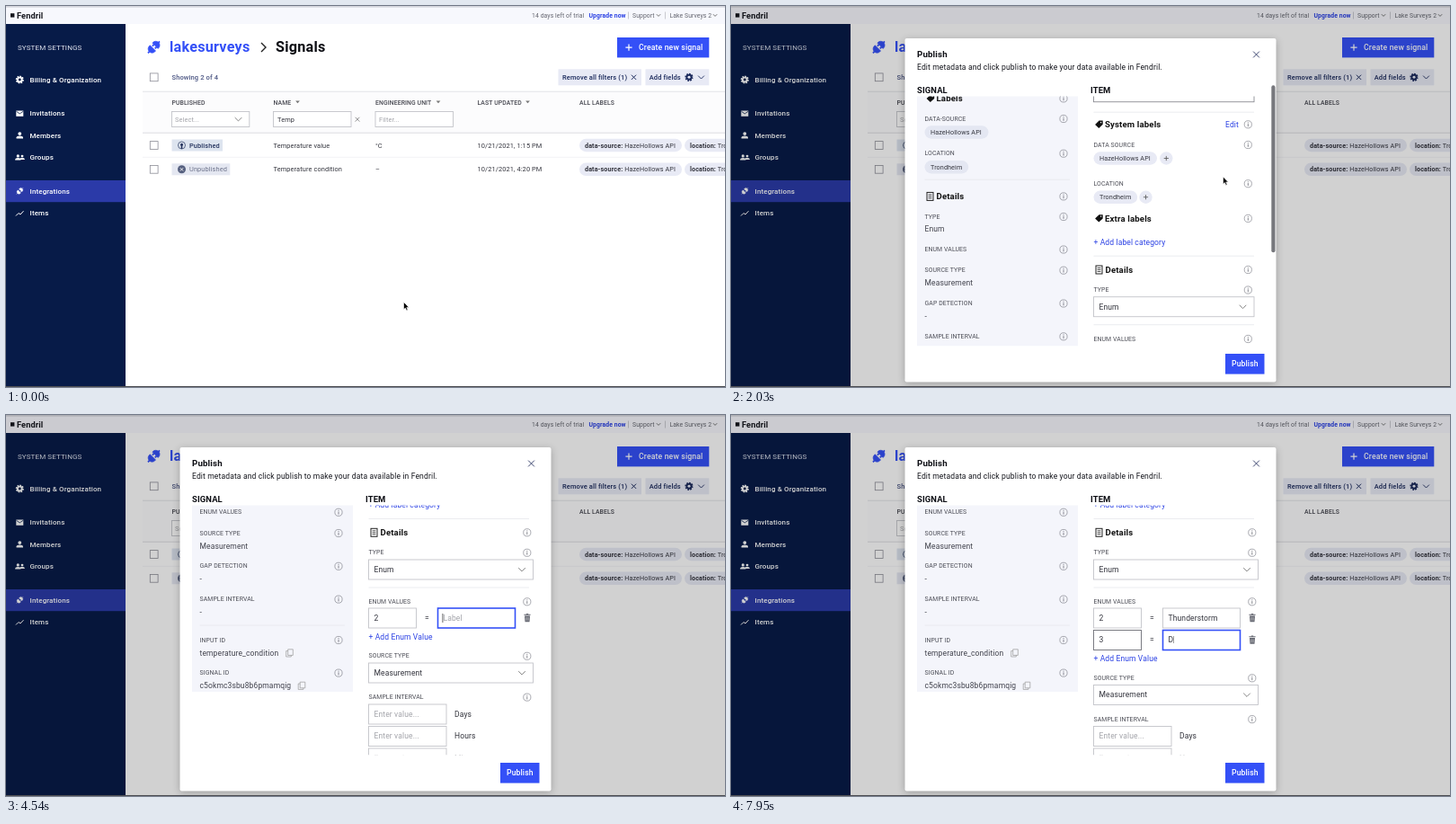
These frames come from a looping animation (800x424 px, 8000 ms). An HTML page:

```html
<!DOCTYPE html>
<html lang="en">
<head>
<meta charset="utf-8">
<title>Publish a signal</title>
<style>
  html, body { margin: 0; width: 100%; height: 100%; overflow: hidden; background: #fff; }
  svg { display: block; width: 800px; height: 424px; }
  text { font-family: Roboto, sans-serif; letter-spacing: .015em; white-space: pre; }
</style>
</head>
<body>
<svg id="stage" viewBox="0 0 800 424"></svg>
<script>
const BLUE = '#3450f7', LINK = '#2b41e4', INK = '#33343d', GREY = '#a3a4aa', CHIP = '#e8eaf5', NAVY = '#1b2a5c';
const LOOP = 8000;
const API = 'HazeHollows API';

// Drawing helpers; text is placed by its left edge and vertical centre.
const text = (x, y, s, size = 8.5, fill = INK, weight = 400, extra = '') =>
  `<text x="${x}" y="${y + size * .35}" font-size="${size}" fill="${fill}" font-weight="${weight}">${s}${extra}</text>`;
const rect = (x, y, w, h, fill, more = '') =>
  `<rect x="${x}" y="${y}" width="${w}" height="${h}" fill="${fill}" ${more}/>`;
const path = (d, stroke, width = 1, fill = 'none', more = '') =>
  `<path d="${d}" stroke="${stroke}" stroke-width="${width}" fill="${fill}" ${more}/>`;
const group = (x, y, content, more = '') => `<g transform="translate(${x} ${y}) ${more}">${content}</g>`;
const box = (x, y, w, h, stroke = '#c3c4c9', width = .9) =>
  rect(x, y, w, h, '#fff', `stroke="${stroke}" stroke-width="${width}"`);
const rule = (x1, x2, y, color = '#e6e7ec') => path(`M${x1} ${y}H${x2}`, color, .8);
const chevron = (x, y, r = 4, color = '#666') => path(`M${x - r} ${y - r / 2}l${r} ${r}l${r} ${-r}`, color, .9);
const cross = (x, y, r, color, width = 1) =>
  path(`M${x - r} ${y - r}l${2 * r} ${2 * r}m0 ${-2 * r}l${-2 * r} ${2 * r}`, color, width);
const plus = (x, y, r, color, width = 1) => path(`M${x - r} ${y}h${2 * r}M${x} ${y - r}v${2 * r}`, color, width);
const gear = (x, y, r, color, hole) =>
  `<circle cx="${x}" cy="${y}" r="${r * .85}" fill="none" stroke="${color}" stroke-width="${r * .4}" pathLength="16" stroke-dasharray="1.2 .8"/>
   <circle cx="${x}" cy="${y}" r="${r * .78}" fill="${color}"/><circle cx="${x}" cy="${y}" r="${r * .34}" fill="${hole}"/>`;
const plug = (x, y, scale, color) => group(x, y,
  path('M-1.5-5.4H-3A5.4 5.4 0 0 0-3 5.4H-1.5ZM3-5.4H4A5.4 5.4 0 0 1 4 5.4H3Z', color, .8, color) +
  path('M-8 0H-11M9 0H11.5M0-2.5H3M0 2.5H3', color, 2.2), `rotate(-45) scale(${scale})`);
const info = (x, y) => `<circle cx="${x}" cy="${y}" r="4.1" fill="none" stroke="#85868e" stroke-width=".7"/>` +
  path(`M${x} ${y - .7}v3M${x} ${y - 2.4}v1`, '#777881', .9);
const chip = (x, y, w, s, fill = CHIP) => rect(x, y - 7.2, w, 14.4, fill, 'rx="7.2"') + text(x + 6.5, y, s, 7.2);
const plusChip = (x, y) => `<circle cx="${x}" cy="${y}" r="7.2" fill="${CHIP}"/>` + plus(x, y, 2.6, '#555', .8);
const label = (x, y, s, infoX) => text(x, y, s, 6.9, '#4a4b54') + info(infoX, y + .3);
const tag = (x, y) => path(`M${x} ${y - 4}h4.2l4.2 4.4-4 4.2-4.4-4.4zm1.4 1.5h1.2v1.2h-1.2z`, 'none', 0, '#111',
  `fill-rule="evenodd" transform="rotate(90 ${x + 4.2} ${y})"`);
const sheet = (x, y) => rect(x, y - 4.5, 7, 9, 'none', 'stroke="#222" stroke-width="1"') +
  path(`M${x + 1.6} ${y - 2}h3.8m-3.8 2h3.8m-3.8 2h3.8`, '#222', .8);
const heading = (x, y, s, icon, infoX) => icon(x, y) + text(x + 10.5, y, s, 9.6, '#111', 700) + info(infoX, y);
const copyIcon = (x, y) => path(`M${x - 1.8} ${y - 4}h5.6v6.6h-5.6zM${x - 1.8} ${y - 2.2}h-2v6.4h5.6v-1.6`, '#999', .7);
const trash = (x, y) => path(`M${x - 3} ${y - 2.4}h6l-.5 6.6h-5zM${x - 3.6} ${y - 4.3}h7.2v1.1h-7.2zM${x - 1.2} ${y - 5}h2.4v1h-2.4z`, 'none', 0, '#666872') +
  path(`M${x - 1} ${y - 1}v3.8m2-3.8v3.8`, '#fff', .5);

function topBar() {
  const small = (x, s, fill = '#62636d', weight = 400) => text(x, 10.5, s, 6.8, fill, weight);
  return rect(0, 0, 800, 20, '#f7f8fd') + rect(0, 0, 800, 1.6, '#d5d6dd') +
    rect(5, 8.2, 4.4, 4.4, '#15161d') + text(12, 10.3, 'Fendril', 9.2, '#15161d', 700) +
    small(585, '14 days left of trial') + small(648.5, 'Upgrade now', LINK, 700) +
    small(697, 'Support') + small(738.5, 'Lake Surveys 2') +
    chevron(726, 10.3, 2.2) + chevron(789, 10.3, 2.2) +
    path('M692.5 6.5v8M733.5 6.5v8', '#b5b6be', .7);
}

function sidebar() {
  const entries = [['Billing &amp; Organization', 82], ['Invitations', 119.5], ['Members', 144],
    ['Groups', 168.5], ['Integrations', 206], ['Items', 230.5]];
  const person = (x, y, k) => group(x, y, '<circle cy="-1.9" r="1.9" fill="#fff"/>' +
    path('M-3.7 3.4V2.3Q-3.4.5 0 .5T3.7 2.3V3.4Z', 'none', 0, '#fff'), `scale(${k})`);
  return rect(0, 20, 133, 404, '#071b48') + rect(0, 194, 133, 24.2, '#2b3aa8') +
    text(13, 46, 'SYSTEM SETTINGS', 8, '#e4e7f1') +
    entries.map(([s, y]) => text(26.5, y, s, 8, '#fff', 500)).join('') +
    gear(15.3, 82, 4.3, '#fff', '#071b48') +
    rect(11.3, 116.5, 8, 6.3, '#fff') + path('M11.5 117.3l3.8 2.6 3.8-2.6', '#071b48', .8) +
    person(15.3, 144, 1) + person(13.3, 168.5, .85) + person(18, 168.5, .75) +
    plug(15.3, 206, .42, '#fff') + path('M11 233.5l3-3 2 1.5 3.5-3.8', '#fff', 1);
}

function table() {
  const columns = [['PUBLISHED', 184.5], ['NAME', 297.5, 324.5], ['ENGINEERING UNIT', 411, 481],
    ['LAST UPDATED', 524.5, 580.5], ['ALL LABELS', 638]];
  const check = y => box(160.3, y - 4.4, 8.8, 8.8, '#8d8e97', .8);
  const row = (y, name, unit, time) => check(y) + text(297.5, y, name, 7.4) + text(411, y, unit, 7.4) +
    text(524.5, y, time, 7.4) + rect(638, y - 7.2, 114, 14.4, CHIP, 'rx="7.2"') +
    text(644, y, '<tspan font-weight="700">data-source:</tspan> ' + API, 7.2) +
    rect(755, y - 7.2, 75, 14.4, CHIP, 'rx="7.2"') +
    text(761, y, '<tspan font-weight="700">location:</tspan> Trondheim', 7.2);
  return plug(164.3, 46, .82, BLUE) + text(182, 45.7, 'lakesurveys', 16.2, BLUE, 700) +
    path('M284 41l5 5-5 5', '#222', 1.4) + text(300, 45.7, 'Signals', 16.2, '#0d0e14', 700) +
    rect(680, 35, 102.3, 22.4, BLUE) + plus(693, 46.2, 3.6, '#fff', 1.2) + text(704, 46.2, 'Create new signal', 8.7, '#fff', 500) +
    check(79.3) + text(184.5, 79.3, 'Showing 2 of 4', 7.5, '#4a5482', 500) +
    rect(614.5, 70.3, 92.5, 18, CHIP) + text(619, 79.3, 'Remove all filters (1)', 7.5, NAVY, 500) + cross(698.5, 79.3, 2.6, NAVY) +
    rect(711.5, 70.3, 70.8, 18, CHIP) + text(715.7, 79.3, 'Add fields', 7.5, NAVY, 500) +
    gear(760, 79.3, 4.4, NAVY, CHIP) + chevron(773.5, 79.3, 3.4, NAVY) +
    rect(152, 95, 648, 46, '#fcfcfd') + rule(152, 800, 95.2, '#dcdde3') + rule(152, 800, 141.2, '#d4d5da') + rule(152, 800, 168.3, '#f0f0f3') +
    columns.map(([s, x, sort]) => text(x, 107.2, s, 6.85, '#464750', 500) +
      (sort ? path(`M${sort - 2.4} 105.5h4.8l-2.4 2.8z`, 'none', 0, '#777') : '')).join('') +
    box(184.5, 117.5, 86.3, 17) + text(188, 126, 'Select...', 7.4, GREY) + chevron(258.5, 126, 3.8, '#777') +
    box(297.5, 117.5, 86.5, 17) + text(302, 126, 'Temp', 7.4) + cross(391, 126.2, 2.4, '#777', .8) +
    box(411, 117.5, 86.5, 17) + text(415, 126, 'Filter...', 7.4, GREY) +
    row(155, 'Temperature value', '°C', '10/21/2021, 1:15 PM') +
    row(181.8, 'Temperature condition', '–', '10/21/2021, 4:20 PM') +
    rect(184.5, 148.5, 56.5, 13, '#dde4ef') + text(204, 155, 'Published', 7.4, '#26345f', 500) +
    '<circle cx="195.5" cy="155" r="4" fill="none" stroke="#4b5a7c" stroke-width=".9"/><circle cx="195.5" cy="154.2" r="1.5" fill="#26345f"/>' +
    path('M195.5 154v5', '#26345f', 1.6) +
    rect(184.5, 175.3, 64.8, 13, '#e4e7f1') + text(204, 181.8, 'Unpublished', 7.4, '#6e748c') +
    '<circle cx="195.5" cy="181.8" r="4.5" fill="#56607f"/>' + cross(195.5, 181.8, 1.7, '#fff', .9);
}

function signalColumn() {
  const x = 215.5, ix = 370;
  const fields = [['NAME', 112], ['DESCRIPTION', 149], ['DATA-SOURCE', 228], ['LOCATION', 266.7], ['TYPE', 337],
    ['ENUM VALUES', 373.5], ['SOURCE TYPE', 396.7], ['GAP DETECTION', 433.5], ['SAMPLE INTERVAL', 470.3],
    ['INPUT ID', 515.7], ['SIGNAL ID', 552.3]];
  const values = [['Temperature condition', 126.5], ['Temperature condition from the', 163.3], [API.replace(/^.*? /, 'HazeHollows '), 174.5],
    ['Enum', 351.3], ['Measurement', 411.3], ['-', 448], ['-', 485], ['temperature_condition', 530.3], ['c5okmc3sbu8b6pmamqig', 566.7]];
  return rect(207, 80, 179, 493.5, '#f4f5fb') +
    fields.map(([s, y]) => label(x, y, s, ix)).join('') +
    values.map(([s, y]) => text(x, y, s, 8.5, '#43444e')).join('') +
    heading(218, 205.7, 'Labels', tag, ix) + heading(218, 314.7, 'Details', sheet, ix) +
    chip(x, 243.3, 71, API, '#e4e7f2') + chip(x, 282, 48.7, 'Trondheim', '#e4e7f2') +
    [187, 296, 499.5].map(y => rule(x, 377, y)).join('') +
    copyIcon(315.5, 530.3) + copyIcon(329, 566.7);
}

function itemColumn({ rows, caret }) {
  const x = 403.5, n = rows.length, grow = n ? 4.5 : 0, width = 178.5 + grow, ix = 575.3 + grow;
  const shift = n ? 1.5 + 24.5 * n : 0;
  const field = (fx, y, w, value, hint, look) =>
    box(fx, y, w, 22, look === 'focus' ? BLUE : look === 'hover' ? '#6d6e76' : undefined, look === 'focus' ? 1.6 : .9) +
    text(fx + 6, y + 11, value || hint, 8.5, value ? INK : GREY, 400,
      look === 'focus' && value && caret ? '<tspan fill="#222" font-weight="300" dx="-.6">|</tspan>' : '') +
    (look === 'focus' && !value && caret ? path(`M${fx + 5.4} ${y + 6}v10`, '#222', .7) : '');
  const select = (y, value) => field(x, y, width, value) + chevron(x + 166 + grow, y + 11, 3.8, '#777');
  const enumRow = (r, i) => {
    const y = 480.5 + 24.5 * i;
    return field(x, y, 53, r.key, 'Key', r.keyLook) + text(466, y + 11, '=', 8.5) +
      field(480.5, y, 86, r.label, 'Label', r.labelLook) + trash(580, y + 11);
  };
  const interval = (unit, i) => {
    const y = 561.5 + shift + 24.5 * i;
    return field(x, y, 86.5, '', 'Enter value...') + text(499, y + 11, unit);
  };
  return label(x, 111, 'NAME', ix) + field(x, 120, width, 'Temperature condition') +
    label(x, 158, 'DESCRIPTION', 900) + box(x, 166, width, 43.5, '#8b8c93') +
    text(409.5, 177.3, 'Temperature condition from the') + text(409.5, 188.3, 'HazeHollows API') +
    rule(x, 582, 221) + heading(405.5, 234.6, 'System labels', tag, ix) + text(550, 234.6, 'Edit', 8.5, LINK) +
    label(x, 257, 'DATA SOURCE', ix) + chip(x, 272.3, 70.5, API) + plusChip(484.3, 272.3) +
    label(x, 300.2, 'LOCATION', ix) + chip(x, 315.5, 48.7, 'Trondheim') + plusChip(461.5, 315.5) +
    heading(405.5, 339.2, 'Extra labels', tag, ix) + text(x, 366, '+ Add label category', 8.5, LINK) +
    rule(x, 582, 381) + heading(406, 396.3, 'Details', sheet, ix) +
    label(x, 418.5, 'TYPE', ix) + select(426.5, 'Enum') + rule(x, 582, 457.5) +
    label(x, 473, 'ENUM VALUES', ix) + rows.map(enumRow).join('') +
    text(x, 486.3 + shift, '+ Add Enum Value', 8.5, LINK) +
    label(x, 507.5 + shift, 'SOURCE TYPE', ix) + select(515.5 + shift, 'Measurement') +
    label(x, 553.3 + shift, 'SAMPLE INTERVAL', ix) +
    ['Days', 'Hours', 'Minutes', 'Seconds'].map(interval).join('');
}

const cursors = {
  arrow: path('M0 0V8.2L1.9 6.5 3.2 9.4 4.6 8.8 3.3 5.9H5.8Z', '#fff', .6, '#000'),
  hand: path('M-1 1a1 1 0 0 1 2 0v3.2l4 .8q1 .3 .8 1.5l-.8 4.5h-5.2l-3.6-4.4q.3-1.4 1.8-.6l1 .9z', '#222', .9, '#fff'),
  beam: path('M-1.8 0q1.8 0 1.8 1.2q0-1.2 1.8-1.2M0 1.2v7M-1.8 9.4q1.8 0 1.8-1.2q0 1.2 1.8 1.2', '#222', .8)
};

const stage = document.getElementById('stage');
stage.innerHTML = `
  <defs><clipPath id="pane"><rect x="194" y="100.5" width="412" height="277.8"/></clipPath>
  <filter id="soft" x="-10%" y="-10%" width="120%" height="120%"><feGaussianBlur stdDeviation="4"/></filter></defs>
  ${rect(0, 0, 800, 424, '#fff')}${table()}${sidebar()}${topBar()}
  <g id="modal">
    ${rect(0, 0, 800, 424, '#000', 'opacity=".18"')}
    ${rect(193.5, 38, 413, 382, '#000', 'opacity=".25" filter="url(#soft)"')}
    ${rect(193.5, 36, 413, 382.5, '#fff', 'rx="2"')}
    <g clip-path="url(#pane)"><g id="content">${signalColumn()}<g id="item"></g></g></g>
    ${text(207, 54, 'Publish', 9.7, '#0d0e14', 700)}
    ${text(207, 68.5, 'Edit metadata and click publish to make your data available in Fendril.', 8.55, '#15161d')}
    ${cross(584.5, 54, 3.4, '#3d4670', 1)}
    ${text(207, 93.6, 'SIGNAL', 9.4, '#0d0e14', 700)}${text(400, 93.6, 'ITEM', 9.4, '#0d0e14', 700)}
    ${rect(550, 387, 43.5, 22.6, BLUE)}${text(557, 398.2, 'Publish', 8.6, '#fff', 500)}
    <rect id="thumb" x="601.3" width="4.2" rx="2.1" fill="#77787d"/>
  </g>
  ${rect(0, 423, 800, 1, '#4c4d52')}
  <g id="cursor"></g>`;
const [modal, content, item, thumb, cursor] =
  ['modal', 'content', 'item', 'thumb', 'cursor'].map(id => document.getElementById(id));

const smooth = u => u * u * (3 - 2 * u);
const linear = u => u;
// Interpolates between [time, ...values] stops.
function along(stops, t, ease) {
  const i = stops.findIndex(s => s[0] > t);
  if (i === 0) return stops[0].slice(1);
  if (i < 0) return stops[stops.length - 1].slice(1);
  const a = stops[i - 1], b = stops[i], u = ease((t - a[0]) / (b[0] - a[0]));
  return a.slice(1).map((v, k) => v + (b[k + 1] - v) * u);
}

const OPEN = 1620, ADD = [3000, 6350];
const SCROLL = [[1690, 0], [1760, 20], [2000, 94], [2300, 179], [2450, 240], [2580, 265.5]];
const POINTER = [[350, 442.5, 329.5], [1340, 606.5, 123], [1600, 547.5, 190], [2580, 547.5, 190], [2900, 467, 217],
  [3150, 467, 217], [3500, 434, 222], [5700, 434, 222], [6050, 434, 244]];
const KEYS = [3950, 6950], TABS = [4350, 7350], LABELS = [4600, 7850], STEP = 85;
const FIRST = 'Thunderstorm';

function enumState(t) {
  const rows = [];
  if (t >= ADD[0]) rows.push({
    key: t >= KEYS[0] ? '2' : '',
    keyLook: t >= 3520 && t < TABS[0] ? 'focus' : '',
    label: FIRST.slice(0, Math.max(0, Math.floor((t - LABELS[0]) / STEP) + 1)),
    labelLook: t >= TABS[0] && t < ADD[1] ? 'focus' : ''
  });
  if (t >= ADD[1]) rows.push({
    key: t >= KEYS[1] ? '3' : '',
    keyLook: t >= 6650 && t < TABS[1] ? 'focus' : 'hover',
    label: t >= LABELS[1] ? 'D' : '',
    labelLook: t >= TABS[1] ? 'focus' : ''
  });
  const lastLetter = LABELS[0] + STEP * (FIRST.length - 1);
  const events = [3520, KEYS[0], TABS[0], LABELS[0], lastLetter, 6650, KEYS[1], TABS[1], LABELS[1]];
  const last = Math.max(0, ...events.filter(e => e <= t));
  const typing = t >= LABELS[0] && t < lastLetter;
  return { rows, caret: typing || (t - last) % 1000 < 500 };
}

function pointerKind(t) {
  if ((t >= KEYS[0] && t < 5700) || t >= KEYS[1]) return '';
  if ((t > 2860 && t < 3200) || (t >= 5980 && t < 6420)) return 'hand';
  return t > 3320 ? 'beam' : 'arrow';
}

let shown = '';
function draw(t) {
  modal.setAttribute('visibility', t >= OPEN ? 'visible' : 'hidden');
  const state = enumState(t), key = JSON.stringify(state), n = state.rows.length;
  if (key !== shown) { item.innerHTML = itemColumn(state); shown = key; }
  const [scroll] = along(SCROLL, t, linear);
  content.setAttribute('transform', `translate(0 ${-scroll})`);
  thumb.setAttribute('y', 38 + scroll * (n ? .475 : .49));
  thumb.setAttribute('height', n ? 179 : 186);
  thumb.setAttribute('opacity', Math.max(0, Math.min(1, (3750 - t) / 200)));
  const [x, y] = along(POINTER, t, smooth);
  cursor.setAttribute('transform', `translate(${x} ${y})`);
  cursor.innerHTML = cursors[pointerKind(t)] || '';
}

const start = performance.now();
function tick() {
  draw((performance.now() - start) % LOOP);
  requestAnimationFrame(tick);
}
draw(0);
requestAnimationFrame(tick);
</script>
</body>
</html>
```
